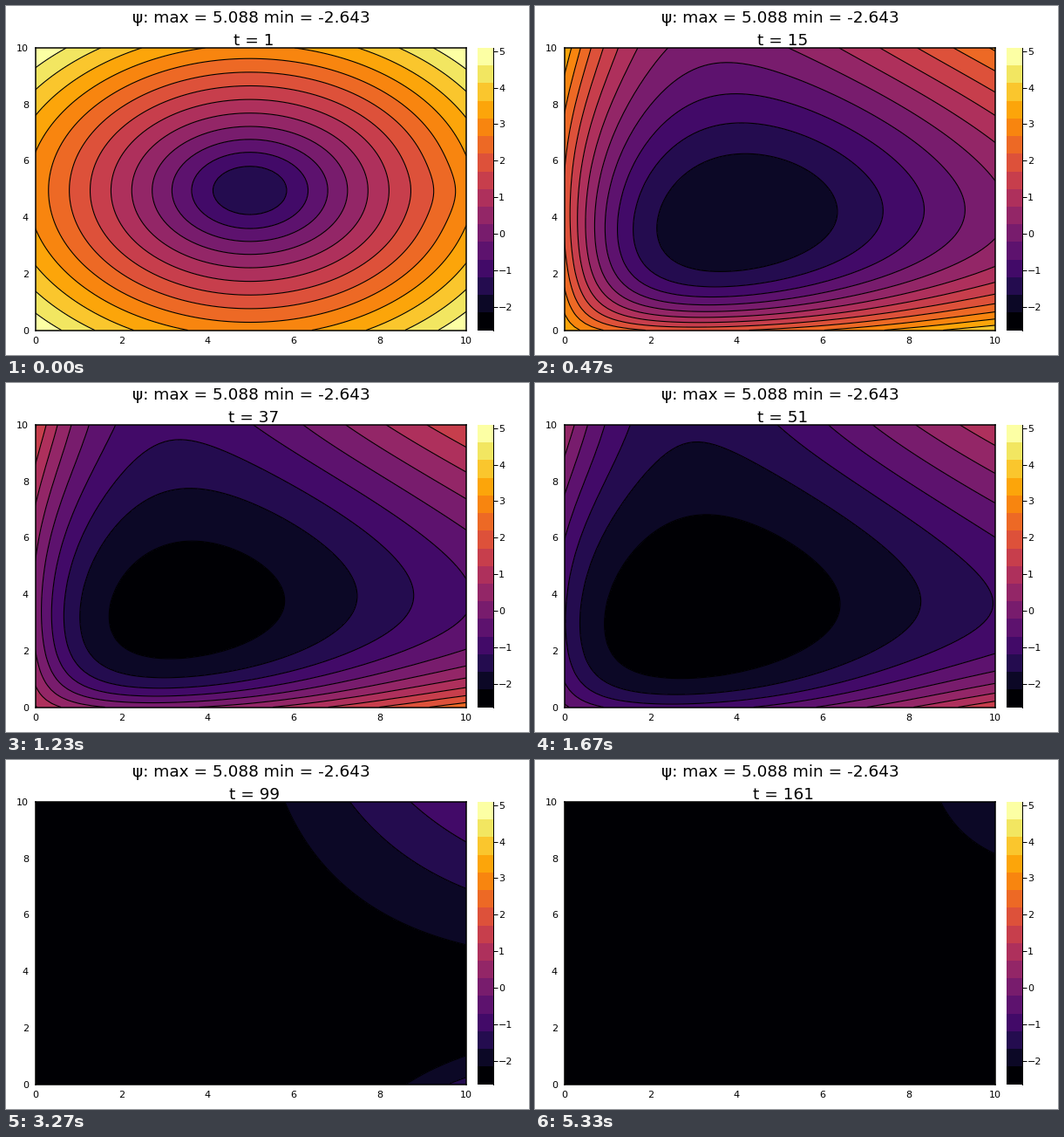
A matplotlib script that plays this animation: 600 px wide and 400 px high, repeating every 5360 ms.

```python
import numpy as np
import matplotlib.pyplot as plt
from matplotlib.animation import FuncAnimation

W, H, DPI = 600, 400, 100
FRAMES, LOOP = 161, 5360
LEFT, RIGHT, TOP, BOTTOM = 33.5, 528, 48, 371.5
LO, HI, BANDS = -2.643, 5.088, 16
STEP = (HI - LO) / BANDS
LEVELS = LO + STEP * np.arange(1, BANDS)
EDGES = [-99, *LEVELS, 99]
COLORS = plt.get_cmap("inferno")(np.linspace(0, 1, BANDS))
PX = 72 / DPI

plt.rcParams["font.family"] = "DejaVu Sans"

grid = np.linspace(0, 10, 81)
GX, GY = np.meshgrid(grid, grid)


def cubic(corners):
    """Bicubic through 4 x 4 values (rows upward), finer near the left and bottom."""
    warp = lambda v: np.vander(np.log1p(v / 8), 4)
    basis = warp(grid) @ np.linalg.inv(warp(np.linspace(0, 10, 4)))
    return basis @ np.array(corners) @ basis.T


# Height at t = 39 and its steady rate of fall, in contour bands.
HEIGHT = cubic([[7.6, 5.4, 7.5, 10.4],
                [5.2, -0.9, 1.0, 3.7],
                [6.3, 0.8, 2.25, 5.1],
                [8.75, 2.9, 5.2, 8.7]])
FALL = cubic([[0.21, 0.17, 0.16, 0.135],
              [0.19, 0.04, 0.04, 0.07],
              [0.165, 0.05, 0.04, 0.06],
              [0.16, 0.08, 0.068, 0.085]])


def cone():
    """Distance to a circle of radius 2, with a rounded tip and a small dent."""
    r = np.hypot(GX - 4.98, GY - 4.95)
    tip = 0.5 * np.exp(-(r / 0.5) ** 2) - 0.08 * np.exp(-(r / 1.9) ** 4)
    dent = 0.1 * np.exp(-((GX - 9.7) ** 2 + (GY - 4.9) ** 2) / 0.8)
    return r - 2 + tip - dent


START = cone()


def basin(t):
    """Walls sinking at their own rates onto a soft floor."""
    clock_t = np.interp(t, [1, 99, FRAMES], [1, 99, 132])
    floor, soft = 0.2, 1.5
    d = HEIGHT - FALL * (clock_t - 39) - floor
    return LO + STEP * (floor + (d + np.hypot(d, soft)) / 2)


def psi(t):
    cone_share = max(0, 1 - (t - 1) / 19) ** 2
    return cone_share * START + (1 - cone_share) * basin(t)


fig = plt.figure(figsize=(W / DPI, H / DPI), dpi=DPI, facecolor="white")


def pixel_axes(x0, y0, x1, y1):
    return fig.add_axes([x0 / W, 1 - y1 / H, (x1 - x0) / W, (y1 - y0) / H])


def label(x, y, text, size=8, ha="center"):
    return fig.text(x / W, 1 - y / H, text, fontsize=size, ha=ha, va="baseline")


ax = pixel_axes(LEFT, TOP, RIGHT, BOTTOM)
ax.set(xlim=(0, 10), ylim=(0, 10), xticks=[], yticks=[])
for spine in ax.spines.values():
    spine.set_linewidth(1.5 * PX)

bar = pixel_axes(540.5, TOP, 558.5, BOTTOM)
bar.set(xlim=(0, 1), ylim=(LO, HI), xticks=[])
for side in ("left", "top", "bottom"):
    bar.spines[side].set_visible(False)
bar.spines["right"].set_linewidth(PX)
for k, color in enumerate(COLORS):
    bar.axhspan(LO + k * STEP, LO + (k + 1) * STEP, color=color, lw=0)
bar.yaxis.tick_right()
bar.set_yticks(range(-2, 6), [""] * 8)
bar.tick_params(length=5 * PX, width=PX)

for v in range(0, 11, 2):
    label(LEFT + v / 10 * (RIGHT - LEFT), 387, str(v))
    label(26, BOTTOM - v / 10 * (BOTTOM - TOP) + 4, str(v), ha="right")
for v in range(-2, 6):
    y = BOTTOM - (v - LO) / (HI - LO) * (BOTTOM - TOP)
    label(565, y + 4, str(v).replace("-", "\u2212"), ha="left")

label(281, 19, f"ψ: max = {HI} min = {LO}", 13.3)
clock = label(284.5, 45, "", 13.3)

drawn = []


def update(i):
    while drawn:
        drawn.pop().remove()
    z = psi(i + 1)
    drawn.append(ax.contourf(GX, GY, z, levels=EDGES, colors=COLORS, zorder=1))
    drawn.append(ax.contour(GX, GY, z, levels=LEVELS, colors="black",
                            linestyles="solid", linewidths=1.1 * PX, zorder=2))
    clock.set_text(f"t = {i + 1}")
    return []


anim = FuncAnimation(fig, update, frames=FRAMES, init_func=lambda: [],
                     interval=LOOP / FRAMES, repeat=True, repeat_delay=0, blit=False)
plt.show()
```
